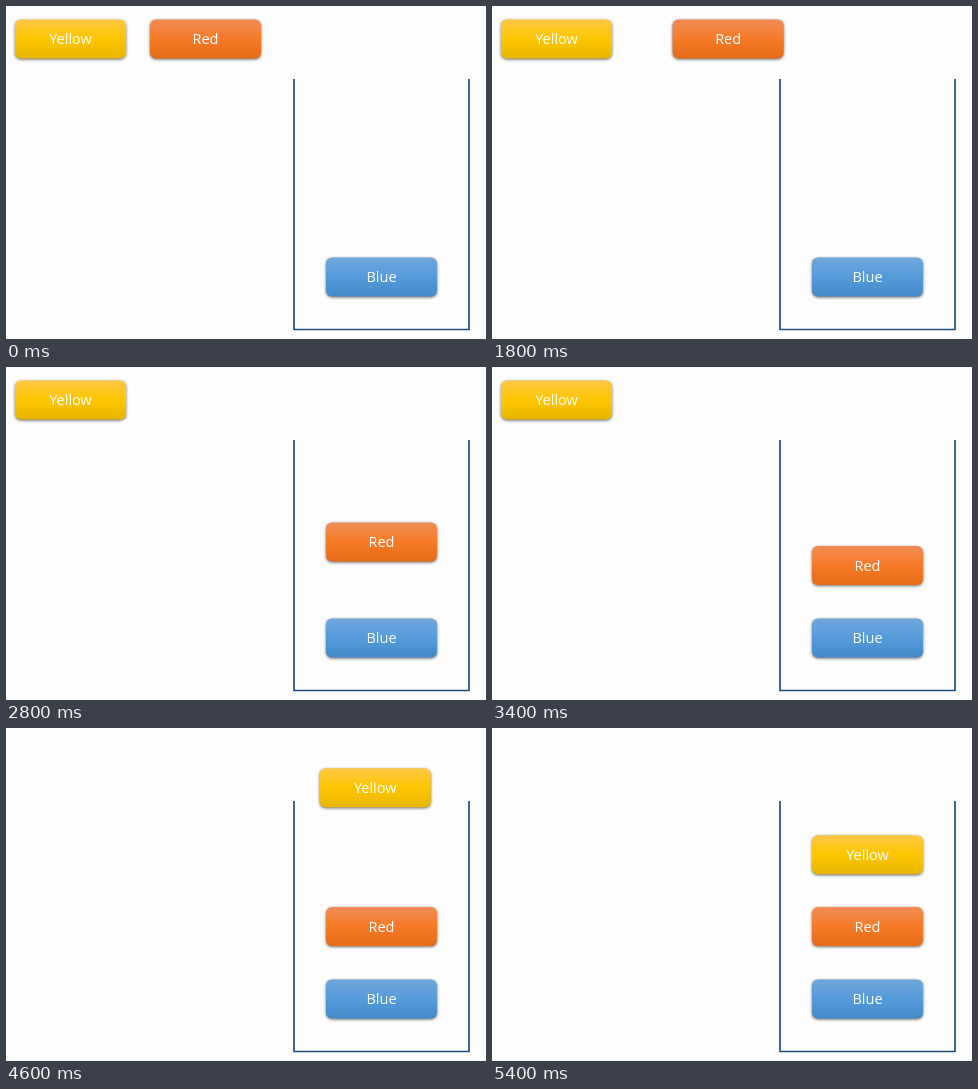
Animation of 480 by 333 pixels, one loop 5700 ms. Source, as an HTML page:

```html
<!DOCTYPE html>
<html lang="en">
<head>
<meta charset="utf-8">
<title>Pushing onto a stack</title>
<style>
  html, body { margin: 0; width: 100%; height: 100%; overflow: hidden; background: #fdfdfd; }
  svg { display: block; width: 480px; height: 333px; }
  rect { filter: drop-shadow(0 1.2px 1.6px rgba(0, 0, 0, .58)); }
  text { font: 14.5px "Open Sans", "Noto Sans", sans-serif; fill: #fff; text-anchor: middle; }
</style>
</head>
<body>
<svg id="stage" viewBox="0 0 480 333">
  <defs id="defs"></defs>
  <path d="M288 73V323.5H463V73" fill="none" stroke="#1f4e79" stroke-width="1.7"/>
</svg>
<script>
const LOOP = 5700, TICK = 100;
const NS = 'http://www.w3.org/2000/svg';
const stage = document.getElementById('stage');
const defs = document.getElementById('defs');

const blocks = [
  { name: 'Blue', colors: ['#71a6db', '#559bdb', '#438ac9'], from: [320, 251.5] },
  { name: 'Red', colors: ['#f18c55', '#f67b28', '#e56b17'], from: [144, 13.5], to: [320, 179], start: 1371, span: 1773 },
  { name: 'Yellow', colors: ['#ffc746', '#ffc600', '#e5b600'], from: [9, 13.5], to: [320, 107.3], start: 3409, span: 1703 }
];

function add(parent, tag, attrs) {
  const el = document.createElementNS(NS, tag);
  for (const key in attrs) el.setAttribute(key, attrs[key]);
  return parent.appendChild(el);
}

// Straight right, a rounded turn, then straight down.
function turnDown([x, y], [x2, y2]) {
  const w = x2 - x, h = y2 - y;
  return `M${x} ${y}h${w / 2}C${x + w * .875} ${y} ${x2} ${y + h * .125} ${x2} ${y + h / 2}V${y2}`;
}

const ease = u => u < .5 ? 2 * u * u : 1 - 2 * (1 - u) ** 2;

for (const b of blocks) {
  const grad = add(defs, 'linearGradient', { id: b.name, x2: 0, y2: 1 });
  b.colors.forEach((c, i) => add(grad, 'stop', { offset: i / 2, 'stop-color': c }));
  b.group = add(stage, 'g', { transform: `translate(${b.from})` });
  add(b.group, 'rect', { width: 111, height: 39, rx: 6, fill: `url(#${b.name})` });
  add(b.group, 'text', { x: 55.5, y: 24.8 }).textContent = b.name;
  if (b.to) {
    b.path = add(defs, 'path', { d: turnDown(b.from, b.to) });
    b.length = b.path.getTotalLength();
  }
}

function draw() {
  const t = Math.floor(performance.now() % LOOP / TICK) * TICK;
  for (const b of blocks) {
    if (!b.path) continue;
    const u = Math.min(1, Math.max(0, (t - b.start) / b.span));
    const p = b.path.getPointAtLength(b.length * ease(u));
    b.group.setAttribute('transform', `translate(${p.x} ${p.y})`);
  }
  requestAnimationFrame(draw);
}
draw();
</script>
</body>
</html>
```
